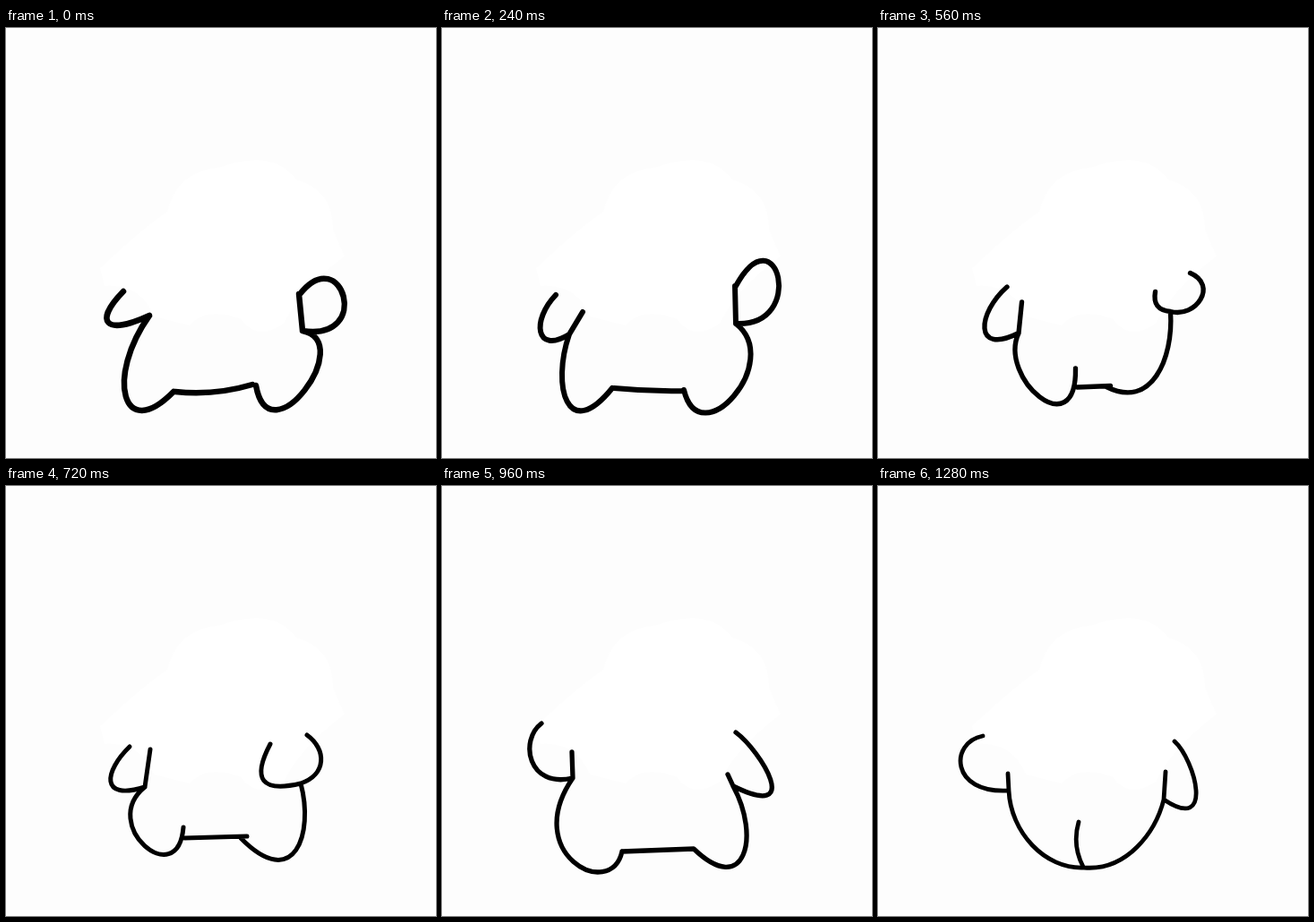
These frames come from a looping animation (480x480 px, 1360 ms). An HTML page:

```html
<!DOCTYPE html>
<html lang="en">
<head>
<meta charset="utf-8">
<title>Dancing outline</title>
<style>
  html, body { margin: 0; height: 100%; overflow: hidden; background: #fdfdfd; }
  svg { display: block; width: 100vw; height: 100vh; }
  #figure { fill: none; stroke: #000; stroke-linecap: round; stroke-linejoin: round; }
</style>
</head>
<body>
<svg viewBox="0 0 480 480">
  <path fill="#fff" d="M105 268Q150 225 180 205Q190 160 240 155Q300 135 325 170Q365 180 365 225L378 255Q330 290 310 330Q280 350 262 325Q225 310 205 332L165 322Q150 285 110 288Z"/>
  <path id="figure"/>
</svg>
<script>
const STEP_MS = 80, STEPS = 17;

// Side: hand, two arm handles, joint, shoulder, two leg handles, foot, shoulder bend.
// Belly: two ends and their bend.
const poses = [
  { step: 0, width: 6.5,
    left: "131 294 98 328 110 344 160 321 160 321 111 390 130 464 187 406 0",
    right: "328 297 375 238 410 350 331 338 327 297 392 350 294 482 279 399 0",
    belly: "189 406 275 398 .1" },
  { step: 3, width: 6,
    left: "127 298 100 326 104 365 142 342 157 317 122 400 140 464 190 402 0",
    right: "328 288 374 204 408 334 328 330 327 288 382 372 288 478 270 404 0",
    belly: "192 402 270 405 .03" },
  { step: 5, width: 5.7,
    left: "150 287 112 318 108 380 159 345 160 318 164 404 252 480 243 379 0",
    right: "361 269 402 280 352 326 324 301 324 301 316 352 288 398 248 408 0",
    belly: "246 409 250 408 0" },
  { step: 9, width: 5,
    left: "138 291 110 318 104 352 155 336 161 294 103 378 192 454 198 381 0",
    right: "336 278 358 294 358 322 329 332 295 288 344 388 322 454 262 393 1.1",
    belly: "199 393 269 391 0" },
  { step: 12, width: 5.3,
    left: "111 265 86 284 96 338 146 326 145 297 88 410 188 464 201 408 0",
    right: "328 275 356 296 404 374 325 335 319 322 356 392 338 460 281 405 0",
    belly: "201 408 281 405 0" },
  { step: 14, width: 5.2,
    left: "118 271 78 280 82 336 144 321 149 307 100 392 206 440 208 396 0",
    right: "326 271 372 284 382 360 323 331 321 310 306 378 290 448 238 394 0",
    belly: "197 388 238 394 .12" },
  { step: 16, width: 4.8,
    left: "117 279 80 286 80 344 146 340 145 321 148 386 186 428 230 426 0",
    right: "331 285 354 306 376 388 319 350 321 319 310 386 278 430 230 426 0",
    belly: "224 375 229 425 .2" }
];

const figure = document.getElementById("figure");
const numbers = text => text.split(" ").map(Number);
const lerp = (a, b, k) => a + (b - a) * k;

// Line from a to b, bowed sideways by a share of its length
function bow(ax, ay, bx, by, bend) {
  const cx = (ax + bx) / 2 - (by - ay) * bend;
  const cy = (ay + by) / 2 + (bx - ax) * bend;
  return `M${ax} ${ay}Q${cx} ${cy} ${bx} ${by}`;
}

function side(n) {
  const joint = n.slice(6, 8), shoulder = n.slice(8, 10);
  return `M${n.slice(0, 2)}C${n.slice(2, 8)}`
    + bow(...shoulder, ...joint, n[16])
    + `C${n.slice(10, 16)}`;
}

function draw(step) {
  const to = poses.find(p => p.step >= step);
  const from = poses.findLast(p => p.step <= step);
  const k = (step - from.step) / (to.step - from.step || 1);
  const part = name => {
    const end = numbers(to[name]);
    return numbers(from[name]).map((v, i) => lerp(v, end[i], k));
  };
  figure.setAttribute("d", side(part("left")) + side(part("right")) + bow(...part("belly")));
  figure.setAttribute("stroke-width", lerp(from.width, to.width, k));
}

const start = performance.now();
function render() {
  draw(Math.floor((performance.now() - start) / STEP_MS) % STEPS);
  requestAnimationFrame(render);
}
render();
</script>
</body>
</html>
```
